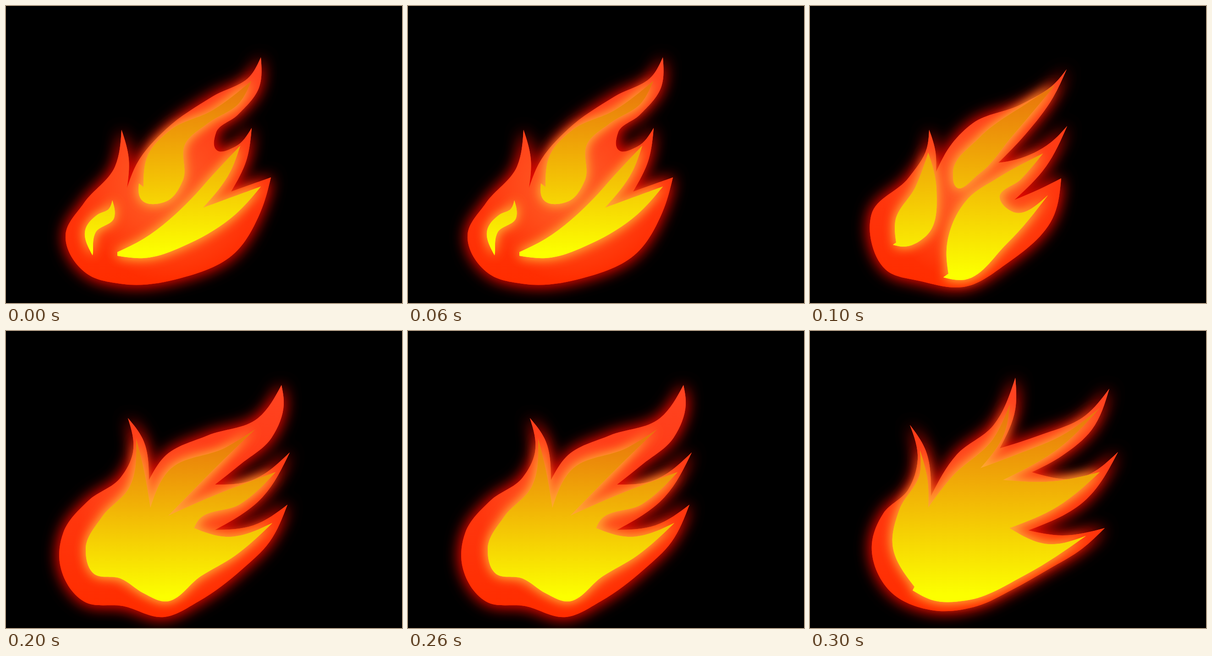
An HTML page with a canvas that plays this animation: 864 px wide and 648 px high, repeating every 400 ms.

```html
<!DOCTYPE html>
<html lang="en">
<head>
<meta charset="utf-8">
<title>Fireball</title>
<style>
html, body { margin: 0; width: 100%; height: 100%; overflow: hidden; background: #000; }
canvas { display: block; }
</style>
</head>
<body>
<canvas id="stage" width="864" height="648"></canvas>
<script>
const W = 864, H = 648, HOLD = 100;

// Key points of each outline as "x,y"; "!" marks a sharp tip or notch.
const lean = {
  body: `556,112! 553,175 505,238 458,277 459,314 500,307 536,266! 525,335 491,405! 578,374! 555,450
    500,538 380,594 250,606 175,583 130,500 170,430 238,350 252,270! 268,335 264,397! 285,345
    350,268 450,198 535,150`,
  cores: [
    `535,164! 510,210 440,256 391,300 386,380 350,426 295,422 290,387! 300,395! 310,325 360,270 450,228`,
    `511,305! 490,360 430,440! 556,394! 500,455 400,518 300,550 243,545! 243,537! 300,508 405,420 450,370`,
    `232,424! 236,462 195,495 190,533! 189,544! 174,485 200,455 225,442`
  ]
};

const split = {
  body: `560,138! 530,200 470,280 411,342! 450,335 525,298 561,262! 515,350 446,423! 500,400 548,376!
    533,455 425,565 340,612 240,600 165,575 134,515 134,455 215,375 255,310 260,270! 274,320
    275,362! 310,300 355,256 460,215 535,168`,
  cores: [
    `535,172! 440,285 370,365 318,394 312,365 370,287 480,208`,
    `508,322! 460,378 414,420 440,448 519,413! 430,518 330,598 291,592! 302,584! 298,530 345,420 410,375`,
    `258,320! 276,400 255,500 205,525 181,521! 188,516! 186,470 230,395`
  ]
};

const wing = {
  body: `601,118! 606,160 580,232 510,292 456,335! 530,328 619,265! 560,362 456,434! 540,424 614,379!
    575,460 515,520 420,590 345,624 255,600 170,590 118,510 125,440 180,370 250,320 277,265
    266,190! 298,235 312,325! 345,275 440,228 550,190`,
  cores: [
    `543,215! 455,300 354,403! 440,365 588,308! 510,378 418,415 410,430! 480,449 581,419! 500,490
    425,535 345,590 300,572 250,540 190,528 174,475 210,405 270,340 284,235! 300,300 315,386!
    355,305 480,254`
  ]
};

const crown = {
  body: `448,102! 448,170 414,256! 500,228 600,185 653,126! 615,215 550,272 484,308! 590,320 672,264!
    603,367 476,435! 550,446 643,430! 595,474 520,520 440,565 365,600 265,609 175,568 135,465
    160,398 215,345 235,280 218,205! 250,255 264,360! 320,270 400,206`,
  cores: [
    `436,160! 425,220 372,299! 450,270 560,222 632,168! 550,250 421,325! 530,328 632,308! 540,383
    435,430! 520,465 602,447! 470,532 340,588 270,588 224,566! 228,558! 180,465 195,390 240,310
    240,260! 257,330 258,385! 310,318 400,235`
  ]
};

function parse(text) {
  return text.trim().split(/\s+/).map(word => {
    const [x, y] = word.split(",").map(parseFloat);
    return { x, y, sharp: word.endsWith("!") };
  });
}

const gap = (a, b) => Math.hypot(b.x - a.x, b.y - a.y);

// Unit direction of the circle through three neighbouring points.
function heading(a, p, b) {
  const k = gap(p, b) / gap(a, p), m = 1 / k;
  const x = (p.x - a.x) * k + (b.x - p.x) * m;
  const y = (p.y - a.y) * k + (b.y - p.y) * m;
  const len = Math.hypot(x, y) || 1;
  return { x: x / len, y: y / len };
}

// Closed smooth curve; next to a sharp point the handle aims at its neighbour's handle.
function outline(points) {
  const n = points.length;
  const at = i => points[(i + n) % n];
  const handle = (i, reach) => {
    const p = at(i), d = heading(at(i - 1), p, at(i + 1));
    return { x: p.x + d.x * reach, y: p.y + d.y * reach };
  };
  const toward = (p, q) => ({ x: (p.x + q.x) / 2, y: (p.y + q.y) / 2 });
  const path = new Path2D();
  path.moveTo(points[0].x, points[0].y);
  points.forEach((p, i) => {
    const q = at(i + 1), reach = gap(p, q) / 3;
    let out = p.sharp ? p : handle(i, reach);
    let into = q.sharp ? q : handle(i + 1, -reach);
    if (p.sharp) out = toward(p, into);
    if (q.sharp) into = toward(q, out);
    path.bezierCurveTo(out.x, out.y, into.x, into.y, q.x, q.y);
  });
  path.closePath();
  return path;
}

function shade(gradient, ...stops) {
  stops.forEach(([at, color]) => gradient.addColorStop(at, color));
  return gradient;
}

function glowFill(g, path, fill, glow, blur) {
  g.fillStyle = fill;
  g.shadowColor = glow;
  g.shadowBlur = blur;
  for (let pass = 0; pass < 2; pass++) g.fill(path);
  g.shadowColor = "transparent";
}

function render({ body, cores }) {
  const layer = document.createElement("canvas");
  layer.width = W;
  layer.height = H;
  const g = layer.getContext("2d");
  g.fillStyle = "#000";
  g.fillRect(0, 0, W, H);

  const shell = outline(parse(body));
  const red = shade(g.createLinearGradient(0, 110, 0, 600), [0, "#ff4422"], [1, "#ff2d00"]);
  glowFill(g, shell, red, "rgba(255,8,0,.75)", 34);
  g.fillStyle = shade(g.createRadialGradient(350, 410, 0, 350, 410, 190),
    [0, "rgba(255,130,60,.55)"], [0.5, "rgba(255,130,60,.3)"], [1, "rgba(255,130,60,0)"]);
  g.fill(shell);

  const parts = cores.map(parse);
  const heights = parts.flat().map(p => p.y);
  const gold = shade(g.createLinearGradient(0, Math.min(...heights), 0, Math.max(...heights)),
    [0, "#e8700c"], [0.97, "#fcff00"]);
  parts.forEach(part => glowFill(g, outline(part), gold, "rgba(255,172,50,.85)", 24));
  return layer;
}

const layers = [lean, split, wing, crown].map(render);
const ctx = document.getElementById("stage").getContext("2d");
const start = performance.now();

function draw() {
  const step = Math.floor((performance.now() - start) / HOLD);
  ctx.drawImage(layers[step % layers.length], 0, 0);
  requestAnimationFrame(draw);
}
draw();
</script>
</body>
</html>
```
